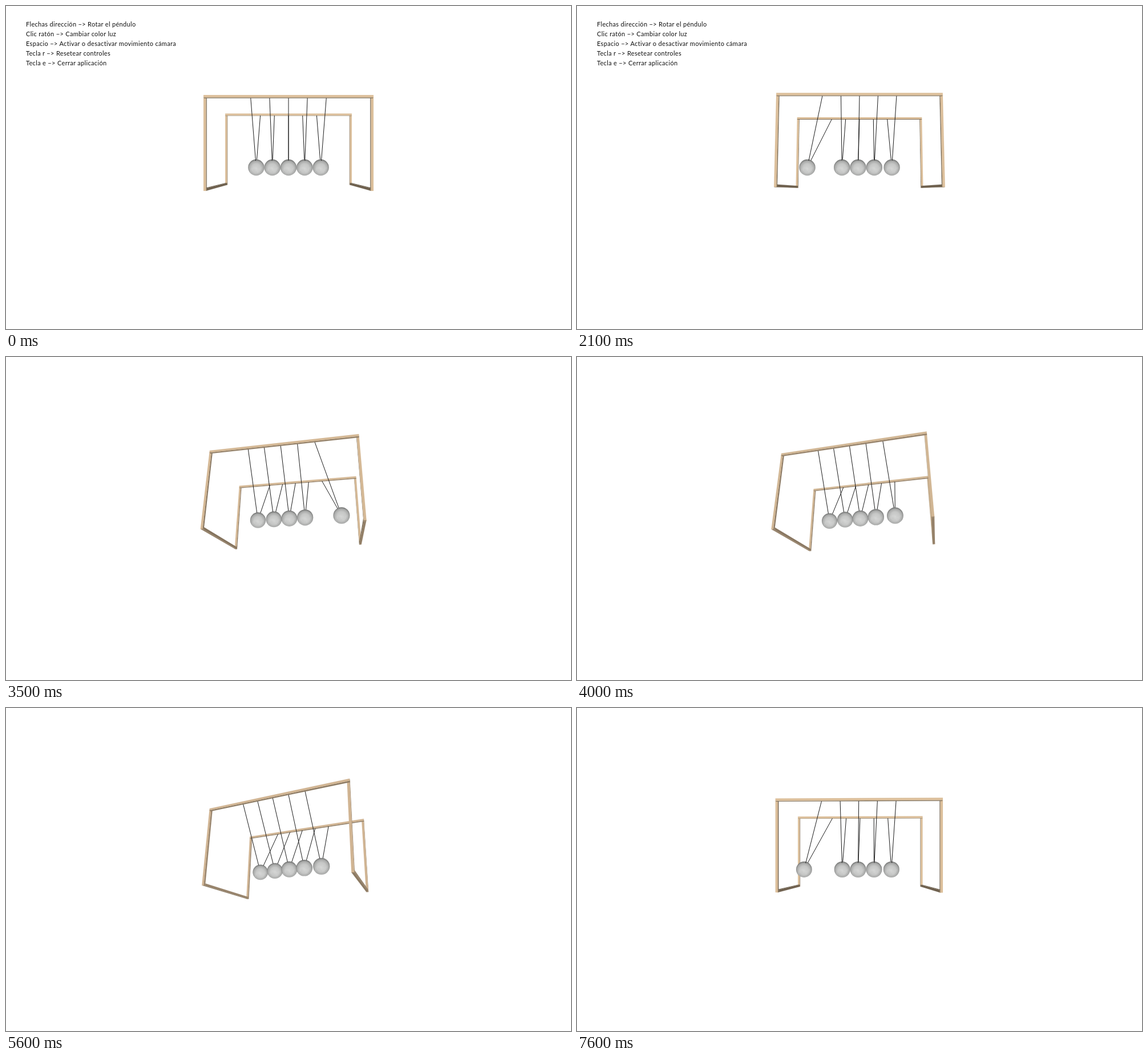
An HTML page that plays this animation: 990x566 px, repeating every 7700 ms.

```html
<!DOCTYPE html>
<html lang="es">
<head>
<meta charset="utf-8">
<title>Péndulo</title>
<style>
  html, body { margin: 0; width: 100%; height: 100%; overflow: hidden; background: #fff; }
  svg { display: block; }
  text { font: 11px Lato, "Open Sans", sans-serif; letter-spacing: .33px; fill: #111; }
</style>
</head>
<body>
<svg width="990" height="566" viewBox="0 0 990 566">
  <defs>
    <radialGradient id="steel" cx=".5" cy=".55" r=".55">
      <stop offset="0" stop-color="#d2d3d2"/>
      <stop offset=".5" stop-color="#c6c7c6"/>
      <stop offset=".8" stop-color="#a9aaa9"/>
      <stop offset="1" stop-color="#6c6d6c"/>
    </radialGradient>
  </defs>
  <g id="scene"></g>
  <g id="help">
    <text x="35" y="35.5">Flechas dirección −&gt; Rotar el péndulo</text>
    <text x="35" y="52.7">Clic ratón −&gt; Cambiar color luz</text>
    <text x="35" y="69.9">Espacio −&gt; Activar o desactivar movimiento cámara</text>
    <text x="35" y="87.1">Tecla r −&gt; Resetear controles</text>
    <text x="35" y="104.3">Tecla e −&gt; Cerrar aplicación</text>
  </g>
</svg>
<script>
const LOOP = 7.7, STEP = .1, FREE_CAMERA = 2.7;
const CX = 495, CY = 283, FOCAL = 490;
const W = 126.6, TOP = -108, BOTTOM = 34.8, DEPTH = 73.4, BAR = 3.7;
const RADIUS = 14.2, GAP = 28.3, WOOD = [220, 191, 155];
const SWING_SPEED = 130.5, RAD = Math.PI / 180;

// Camera stops: seconds, yaw and pitch in degrees
const CAMERA = [
  [0, 0, 0], [1.65, 0, 0], [2.1, 0, 4.6], [3.5, 11.5, 19], [4.6, 19, 23],
  [5.6, 23, 15.5], [6.7, 32, 9], [7.2, .9, 0], [LOOP, .9, 0]
];

const scene = document.getElementById('scene');
const help = document.getElementById('help');
let view;

function cameraAt(t) {
  const i = Math.max(1, CAMERA.findIndex(k => k[0] >= t));
  const a = CAMERA[i - 1], b = CAMERA[i], u = (t - a[0]) / (b[0] - a[0]);
  return [1, 2].map(j => a[j] + (b[j] - a[j]) * u);
}

function setView(t) {
  const sinCos = deg => [Math.sin(deg * RAD), Math.cos(deg * RAD)];
  const [yaw, pitch] = cameraAt(t).map(sinCos);
  const roll = sinCos(8 * yaw[0] * pitch[0]);
  view = { yaw, pitch, roll, zoom: t < FREE_CAMERA ? 1 : .985 };
}

function rotate([x, y, z]) {
  const [sa, ca] = view.yaw, [sb, cb] = view.pitch, [sr, cr] = view.roll;
  const x1 = x * ca - z * sa, z1 = x * sa + z * ca;
  const y1 = y * cb - z1 * sb, z2 = y * sb + z1 * cb;
  return [x1 * cr - y1 * sr, x1 * sr + y1 * cr, z2];
}

function project(p) {
  const [x, y, z] = rotate(p), s = view.zoom * FOCAL / (FOCAL - z);
  return [CX + x * s, CY + y * s, s];
}

const xy = p => p[0].toFixed(2) + ' ' + p[1].toFixed(2);

// Visible faces of the box between two opposite corners, lit from the viewer
function box(lo, hi) {
  let out = '';
  for (let axis = 0; axis < 3; axis++) for (const side of [-1, 1]) {
    const b = (axis + 1) % 3, c = (axis + 2) % 3;
    const normal = [0, 0, 0], middle = lo.map((v, i) => (v + hi[i]) / 2);
    normal[axis] = side;
    middle[axis] = side < 0 ? lo[axis] : hi[axis];
    const n = rotate(normal), m = rotate(middle);
    if (n[2] * (FOCAL - m[2]) - n[0] * m[0] - n[1] * m[1] <= 0) continue;
    const corners = [[0, 0], [1, 0], [1, 1], [0, 1]].map(([u, v]) => {
      const p = middle.slice();
      p[b] = u ? hi[b] : lo[b];
      p[c] = v ? hi[c] : lo[c];
      return xy(project(p));
    });
    const light = .5 + .5 * Math.max(0, n[2]);
    const color = `rgb(${WOOD.map(v => Math.round(v * light))})`;
    out += `<path d="M${corners.join('L')}Z" fill="${color}" stroke="${color}" stroke-width=".2"/>`;
  }
  return out;
}

function arch(z0, z1) {
  const top = TOP + BAR;
  return box([-W, top, z0], [-W + BAR, BOTTOM, z1]) +
    box([W - BAR, top, z0], [W, BOTTOM, z1]) +
    box([-W, TOP, z0], [W, top, z1]);
}

function foot(x) {
  const z = DEPTH - BAR;
  return box([x, BOTTOM - BAR, -z], [x + BAR, BOTTOM, z]);
}

function string(from, to) {
  return `<path d="M${xy(project(from))}L${xy(project(to))}" stroke="#1c1c1c"/>`;
}

function ball(x) {
  const [px, py, s] = project([x, 0, 0]), r = RADIUS * s;
  let grain = '';
  for (let i = -4; i <= 4; i++) {
    const wobble = Math.sin(i * 7.3);
    grain += `M${xy([px + i * r * .17, py + r * (.02 + .12 * wobble)])}v${(r * (.42 + .14 * wobble)).toFixed(2)}`;
  }
  return `<circle cx="${px.toFixed(2)}" cy="${py.toFixed(2)}" r="${r.toFixed(2)}" fill="url(#steel)"/>` +
    `<path d="${grain}" stroke="#fff" stroke-opacity=".22" stroke-width=".8"/>`;
}

function pendulum(offset, i) {
  const rest = (i - 2) * GAP, x = rest + offset;
  const y = TOP + BAR, z = DEPTH - BAR / 2;
  const k = RADIUS / Math.hypot(offset, y, z);
  const entry = [x - offset * k, y * k, z * k];
  return string([rest, y, -z], [x, 0, 0]) + ball(x) + string([rest, y, z], entry);
}

// The outer balls take turns; the inner ones are nudged by each hit
function offsets(t) {
  const wave = Math.sin(t * SWING_SPEED * RAD);
  const reach = Math.abs(wave) ** 1.6;
  const left = wave < 0 ? reach : 0, right = reach - left;
  const amplitude = 35 + 8 * (t / LOOP) ** 6;
  const drift = t < FREE_CAMERA ? 0 : 1.5;
  const inner = drift * (1 - left) - 2.5 * left;
  return [-amplitude * left, inner, inner, inner, drift * (1 - left) + amplitude * right];
}

function draw(t) {
  setView(t);
  help.style.display = t < FREE_CAMERA ? '' : 'none';
  scene.innerHTML = arch(-DEPTH, -DEPTH + BAR) + foot(-W) + foot(W - BAR) +
    offsets(t).map(pendulum).join('') + arch(DEPTH - BAR, DEPTH);
}

const start = performance.now();
function tick() {
  const t = (performance.now() - start) / 1000 % LOOP;
  draw(Math.floor(t / STEP) * STEP);
  requestAnimationFrame(tick);
}
tick();
</script>
</body>
</html>
```
